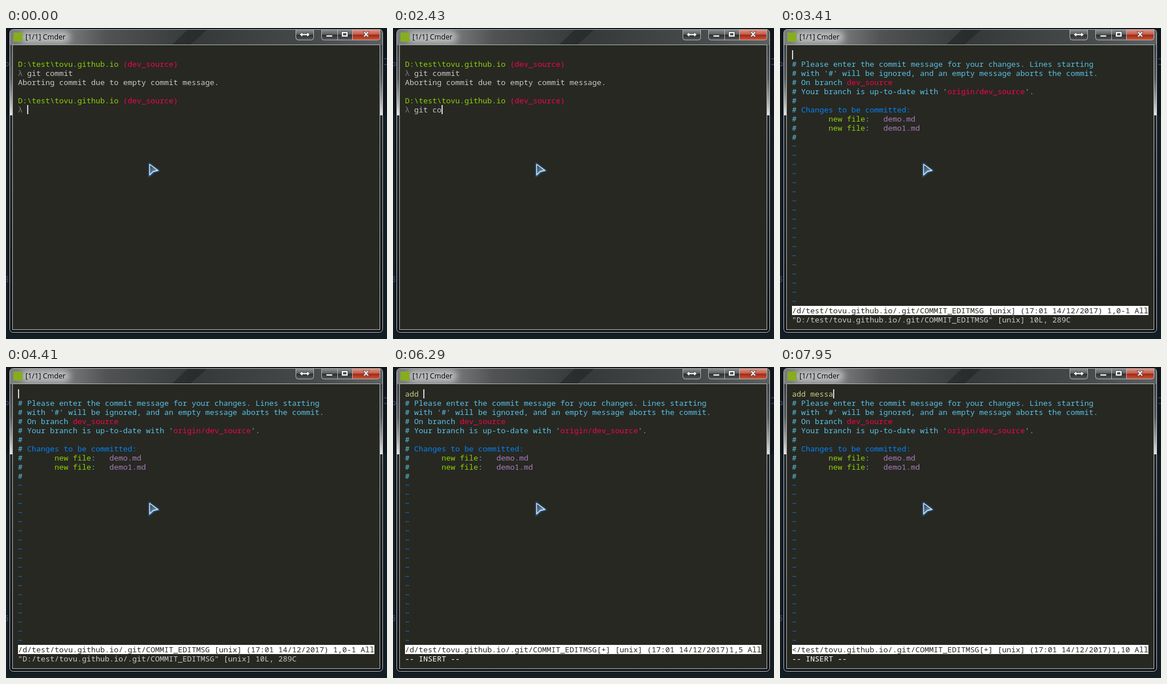
Write an HTML page that moves like this. It is 667 by 545 pixels and loops after 8 s.

```html
<!DOCTYPE html>
<html lang="en">
<head>
<meta charset="utf-8">
<title>Commit message</title>
<style>
  html, body { margin: 0; width: 100%; height: 100%; overflow: hidden; background: #131d24; }
  #stage { position: relative; width: 667px; height: 545px; overflow: hidden; }
  svg { position: absolute; left: 0; top: 0; }
  #screen {
    position: absolute; left: 21px; top: 39px; margin: 0; color: #cacaca;
    font: 13.3333px/16px "Noto Sans Mono", "DejaVu Sans Mono", monospace;
    font-variant-ligatures: none; white-space: pre;
  }
  #caret { position: absolute; width: 2px; height: 16px; background: #d8d7dd; }
  .gray { color: #7c7c7c; }
  .blue { color: #0383f5; }
  .green { color: #8dd006; }
  .cyan { color: #58c2e5; }
  .red { color: #f3044b; }
  .purple { color: #a87db8; }
  .yellow { color: #cccc81; }
  .white { color: #fff; }
  .status { display: inline-block; height: 16px; vertical-align: top; color: #272822; background: #fff; }
</style>
</head>
<body>
<div id="stage">
  <svg width="667" height="545" viewBox="0 0 667 545">
    <defs>
      <linearGradient id="side" x2="0" y2="1">
        <stop offset="0" stop-color="#34373a"/>
        <stop offset=".16" stop-color="#55585a"/>
        <stop offset=".235" stop-color="#a4a6a6"/>
        <stop offset=".283" stop-color="#e4e4e4"/>
        <stop offset=".284" stop-color="#24282b"/>
        <stop offset="1" stop-color="#11161a"/>
      </linearGradient>
      <linearGradient id="bar">
        <stop offset="0" stop-color="#7b7d7e"/>
        <stop offset=".13" stop-color="#808283"/>
        <stop offset=".26" stop-color="#505254"/>
        <stop offset=".5" stop-color="#36393a"/>
        <stop offset=".8" stop-color="#46494a"/>
        <stop offset="1" stop-color="#5c5f60"/>
      </linearGradient>
      <linearGradient id="button" x2="0" y2="1">
        <stop offset="0" stop-color="#8b8d8f"/>
        <stop offset=".48" stop-color="#5b5d5f"/>
        <stop offset=".5" stop-color="#292b2d"/>
        <stop offset="1" stop-color="#56585a"/>
      </linearGradient>
      <linearGradient id="close" x2="0" y2="1">
        <stop offset="0" stop-color="#dc9a8c"/>
        <stop offset=".48" stop-color="#c15b48"/>
        <stop offset=".5" stop-color="#a42512"/>
        <stop offset="1" stop-color="#c8573a"/>
      </linearGradient>
      <linearGradient id="pointer" x2="1" y2="1">
        <stop offset="0" stop-color="#26384a"/>
        <stop offset="1" stop-color="#8fb6d8"/>
      </linearGradient>
      <filter id="blur" x="-50%" y="-100%" width="200%" height="300%"><feGaussianBlur stdDeviation="6"/></filter>
      <filter id="glow" x="-50%" y="-50%" width="200%" height="200%"><feGaussianBlur stdDeviation="1.1"/></filter>
      <clipPath id="title"><path d="M7 30V9q0-6 6-6H653q6 0 6 6V30z"/></clipPath>
    </defs>

    <rect width="667" height="545" fill="#131d24"/>
    <path d="M0 0H6V153H0zM660 0H667V153H660z" fill="#10171c"/>
    <path d="M0 60l4 1v5H0M0 436h4M0 439l3 1v4l-3 1M662 54h5M662 64h5" fill="none" stroke="#4a5f9c"/>

    <rect x="5.500" y="1.500" width="655" height="533" rx="7" fill="none" stroke="#05080a"/>
    <rect x="6.500" y="2.500" width="653" height="531" rx="6" fill="url(#side)"/>
    <g clip-path="url(#title)">
      <rect x="7" y="3" width="652" height="27" fill="url(#bar)"/>
      <path d="M290 30L318 3H352L322 30z" fill="#0d0f10" opacity=".3"/>
      <rect x="26" y="6" width="86" height="20" rx="9" fill="#d2d4d4" opacity=".75" filter="url(#blur)"/>
    </g>
    <rect x="6.500" y="2.500" width="653" height="531" rx="6" fill="none" stroke="#c2c7c9"/>
    <rect x="11.500" y="29.500" width="643" height="499" fill="#272822" stroke="#b4b8ba"/>

    <rect x="13" y="8" width="16" height="16" fill="#86ad20"/>
    <text x="34" y="20" font-family="Open Sans, Noto Sans, sans-serif" font-size="12.6">[1/1] Cmder</text>

    <g stroke="#b6b9bb">
      <path d="M507.500 2.500H538.500V17q0 4-4 4H511.500q-4 0-4-4z" fill="url(#button)"/>
      <path d="M552.500 2.500H580.500V21H556.500q-4 0-4-4z" fill="url(#button)"/>
      <path d="M580.500 2.500H606.500V21H580.500z" fill="url(#button)"/>
      <path d="M606.500 2.500H654.500V17q0 4-4 4H606.500z" fill="url(#close)"/>
    </g>
    <g fill="#fff" stroke="#34383c" stroke-width=".8">
      <path d="M514 11.500l5-4.500v3h8V7l5 4.500-5 4.500v-3h-8v3z"/>
      <rect x="560.500" y="12.500" width="11" height="3"/>
      <path fill-rule="evenodd" d="M587.500 6.500h11v9h-11zM590.500 9.500v3h5v-3z"/>
      <path d="M625 6.500h3.500l2 2.500 2-2.500h3.500l-3.700 4.500 3.700 4.500h-3.500l-2-2.500-2 2.500H625l3.700-4.500z"/>
    </g>
  </svg>

  <pre id="screen"></pre>
  <div id="caret"></div>

  <svg width="667" height="545" viewBox="0 0 667 545">
    <path d="M251 238L267 250L259 252L251 259z" fill="#3f9cf0" stroke="#2f86de" stroke-width="2" filter="url(#glow)"/>
    <path d="M251.500 239L266 249.500L257.500 251.500L251.500 257.500z" fill="url(#pointer)" stroke="#e6f0fa" stroke-width="1.3" stroke-linejoin="round"/>
  </svg>
</div>

<script>
const LOOP = 8000, COLUMNS = 78;
const REPO = "tovu.github.io";

// [start ms, screen, typed text, caret hidden]
const steps = [
  [0, "shell", ""],
  [310, "shell", "g"],
  [900, "shell", "g", true],
  [1170, "shell", ""],
  [1290, "shell", "g"],
  [1410, "shell", "gi"],
  [1560, "shell", "git"],
  [1840, "shell", "git "],
  [2280, "shell", "git c"],
  [2430, "shell", "git co"],
  [2550, "shell", "git com"],
  [2700, "shell", "git commit"],
  [3260, "shell", "git commit\n"],
  [3410, "normal", ""],
  [3970, "normal", "", true],
  [4410, "normal", ""],
  [5030, "normal", "", true],
  [5180, "insert", "", true],
  [5450, "insert", "a"],
  [6010, "insert", "ad"],
  [6160, "insert", "add"],
  [6290, "insert", "add "],
  [6560, "insert", "add m"],
  [6810, "insert", "add me"],
  [7210, "insert", "add mes"],
  [7360, "insert", "add mess"],
  [7950, "insert", "add messa"]
];

const screen = document.getElementById("screen");
const caret = document.getElementById("caret");
const ink = (color, text) => `<span class="${color}">${text.replace(/</g, "&lt;")}</span>`;

function shellLines(typed) {
  const prompt = ink("green", `D:\\test\\${REPO} `) + ink("red", "(dev_source)");
  const lambda = ink("gray", "λ ");
  return ["", prompt, lambda + "git commit", "Aborting commit due to empty commit message.",
    "", prompt, lambda + typed];
}

function statusLine(mode, typed) {
  const position = mode === "normal" ? "1,0-1" : `1,${typed.length + 1}`;
  const tail = position + " All";
  const room = COLUMNS - tail.length;
  let file = `/d/test/${REPO}/.git/COMMIT_EDITMSG${typed && "[+]"} [unix] (17:01 14/12/2017)`;
  if (file.length > room) file = "<" + file.slice(file.length - room + 1);
  return ink("status", file.padEnd(room) + tail);
}

function editorLines(mode, typed) {
  const comment = text => ink("cyan", "# " + text);
  const newFile = name => comment("      ") + ink("green", "new file") + ink("cyan", ":   ") + ink("purple", name);
  return [
    ink("yellow", typed),
    comment("Please enter the commit message for your changes. Lines starting"),
    comment("with '#' will be ignored, and an empty message aborts the commit."),
    comment("On branch ") + ink("red", "dev_source"),
    comment("Your branch is up-to-date with '") + ink("red", "origin/dev_source") + ink("cyan", "'."),
    comment(""),
    comment("") + ink("blue", "Changes to be committed:"),
    newFile("demo.md"),
    newFile("demo1.md"),
    comment(""),
    ...Array(18).fill(ink("blue", "~")),
    statusLine(mode, typed),
    mode === "insert" ? ink("white", "-- INSERT --")
      : `"D:/test/${REPO}/.git/COMMIT_EDITMSG" [unix] 10L, 289C`
  ];
}

function show([, mode, typed, hidden]) {
  const shell = mode === "shell";
  const entered = typed.endsWith("\n");
  const column = entered ? 0 : typed.length + (shell ? 2 : 0);
  const row = shell ? (entered ? 7 : 6) : 0;
  screen.innerHTML = (shell ? shellLines(typed) : editorLines(mode, typed)).join("\n");
  caret.style.left = 21 + 8 * column + "px";
  caret.style.top = 39 + 16 * row + "px";
  caret.style.visibility = hidden ? "hidden" : "visible";
}

let shown;
const start = performance.now();
function tick() {
  const time = (performance.now() - start) % LOOP;
  const step = steps.findLast(([at]) => at <= time);
  if (step !== shown) show(shown = step);
  requestAnimationFrame(tick);
}
tick();
</script>
</body>
</html>
```
